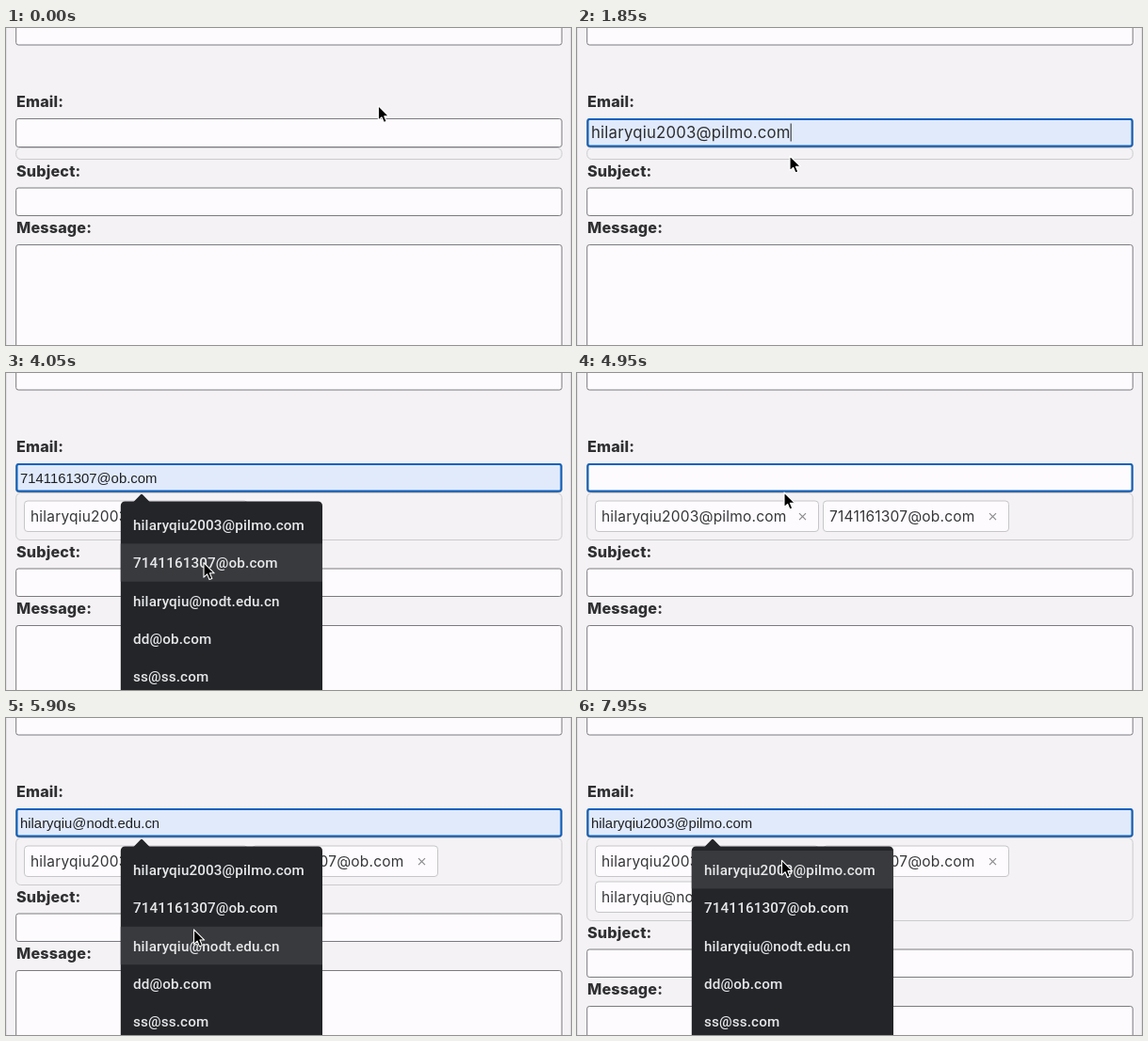
Recreate the animation shown at these times as an HTML page. Size 600 by 337 pixels, loop 8 s.

```html
<!DOCTYPE html>
<html lang="en">
<head>
<meta charset="utf-8">
<title>Email tag input</title>
<style>
html, body { margin: 0; width: 100%; height: 100%; overflow: hidden; background: #f4f2f5; }
svg { display: block; width: 100vw; height: 100vh; }
text { white-space: pre; }
.label { font: 800 16.2px Inter, sans-serif; letter-spacing: .15px; fill: #303033; }
.box { fill: #fdfbfe; stroke: #7b7a7e; }
.typed { font: 400 16.7px Inter, sans-serif; letter-spacing: .22px; fill: #2d2d30; }
.preview { font: 14.87px "Liberation Sans", Arial, sans-serif; fill: #202124; }
.tags { fill: #f4f2f5; stroke: #cbcacd; }
.tag rect { fill: #fdfbfe; stroke: #c6c5c9; }
.tag text { font: 400 15.5px Inter, sans-serif; letter-spacing: .2px; fill: #363639; }
.tag path { fill: none; stroke: #8b8a8e; stroke-width: 1.2; }
.menu { fill: #232528; }
.menu text { font: 500 15.2px Roboto, sans-serif; letter-spacing: .15px; fill: #e6e7e9; }
</style>
</head>
<body>
<svg viewBox="0 0 600 337" preserveAspectRatio="none">
  <defs>
    <path id="bar" d="M-3.2 -9Q0 -9 0 -6.5Q0 -9 3.2 -9M0 -6.5V6.5M-3.2 9Q0 9 0 6.5Q0 9 3.2 9M-1.8 3.5H1.8"/>
  </defs>
  <path d="M.5 0V337M599.5 0V337" stroke="#e3e1e5"/>
  <rect class="box" x="10.7" y="-20" width="579.5" height="38" rx="2.5"/>
  <text class="label" x="11" y="83.5">Email:</text>
  <rect class="box" x="10.7" y="96.5" width="579.5" height="30" rx="2.5"/>
  <rect id="focus" x="11.5" y="97" width="578" height="28.5" rx="2" stroke="#0f62be" stroke-width="2"/>
  <text id="value" x="15" y="116.5"></text>
  <path id="caret" stroke="#222" d="M0 101.5V120.5"/>
  <rect class="tags" id="tags" x="10.7" y="127.5" width="579.5" rx="5"/>
  <g id="list"></g>
  <g id="below">
    <text class="label" x="11" y="157.5">Subject:</text>
    <rect class="box" x="10.7" y="170" width="579.5" height="29.5" rx="2.5"/>
    <text class="label" x="11" y="218">Message:</text>
    <rect class="box" x="10.7" y="230.5" width="579.5" height="150" rx="2.5"/>
  </g>
  <g class="menu" id="menu">
    <path d="M134.5 138L142.7 129.4Q144 128 145.3 129.4L153.5 138Z"/>
    <rect x="121.8" y="136.5" width="214.2" height="230" rx="4.5"/>
    <rect id="hover" x="121.8" width="214.2" height="40.4" fill="#393a3d"/>
  </g>
  <g id="cursor">
    <path id="arrow" d="M0 0V15.6L3.6 12.3L6 18L8.8 16.8L6.4 11.2H11.2Z" stroke="#fff" stroke-width="1.1" stroke-linejoin="round"/>
    <g id="beam" fill="none" stroke-linecap="round">
      <use href="#bar" stroke="#fff" stroke-width="2.6"/>
      <use href="#bar" stroke="#222" stroke-width="1.2"/>
    </g>
  </g>
</svg>
<script>
const LOOP = 8000, ROW_TOP = 141, ROW = 40.4, LINE = 38;
const MS_PER_PX = 3.6, PAUSE = 350;
const mails = ['hilaryqiu2003@pilmo.com', '7141161307@ob.com', 'hilaryqiu@nodt.edu.cn', 'dd@ob.com', 'ss@ss.com'];

// Each round opens the menu, picks a row, rests the pointer and adds a chip.
const rounds = [
  { row: 0, open: 700, pick: 1600, add: 2500, rest: [226, 136] },
  { row: 1, open: 3050, pick: 4150, add: 4600, rest: [220, 127] },
  { row: 2, open: 5250, pick: 6400, add: 7100, rest: [222, 151] },
  { row: 0, open: 7500, pick: LOOP, add: LOOP, rest: [222, 151] }
];
const home = [399, 82], inField = [203, 111];
const rowSpot = row => [221 - 11 * row, ROW_TOP + ROW * (row + .5)];

const $ = id => document.getElementById(id);
const show = (el, on) => el.setAttribute('visibility', on ? 'visible' : 'hidden');
const shiftY = (el, y) => el.setAttribute('transform', `translate(0 ${y})`);

function add(parent, name, attrs, text = '') {
  const el = document.createElementNS('http://www.w3.org/2000/svg', name);
  for (const k in attrs) el.setAttribute(k, attrs[k]);
  el.textContent = text;
  return parent.appendChild(el);
}

function chip(x, y, w, mail) {
  const g = add($('list'), 'g', { class: 'tag' });
  add(g, 'rect', { x, y, width: w, height: 32.5, rx: 3.5 });
  add(g, 'text', { x: x + 6.5, y: y + 21.5 }, mail);
  add(g, 'path', { d: `M${x + w - 20.5} ${y + 13.2}l7 7m0 -7l-7 7` });
  return g;
}
const chips = [
  chip(19.5, 136, 237, mails[0]),
  chip(261.5, 136, 197, mails[1]),
  chip(19.5, 136 + LINE, 212, mails[2])
];
mails.forEach((m, i) => add($('menu'), 'text', { x: 135, y: 166.8 + i * ROW }, m));

const travel = (a, b) => MS_PER_PX * Math.max(Math.abs(b[0] - a[0]), Math.abs(b[1] - a[1]));

// Pointer moves: rest to field, field to row, row to the next rest.
const moves = [];
let from = home;
for (const r of rounds) {
  const spot = rowSpot(r.row);
  moves.push([r.open - travel(from, inField), from, inField]);
  moves.push([r.open + PAUSE, inField, spot]);
  moves.push([r.pick + 100, spot, r.rest]);
  from = r.rest;
}

function pointer(t) {
  const [start, a, b] = moves.filter(m => m[0] <= t).pop() || [0, home, home];
  const left = 1 - Math.min(1, (t - start) / (travel(a, b) || 1));
  return a.map((v, i) => b[i] + (v - b[i]) * left * left);
}

function draw(t) {
  const [x, y] = pointer(t);
  const open = rounds.some(r => t >= r.open && t < r.pick);
  const picked = rounds.find(r => t >= r.pick && t < r.add);
  const count = rounds.filter(r => t >= r.add).length;
  const hovered = open && y >= ROW_TOP ? Math.floor((y - ROW_TOP) / ROW) : -1;
  const shift = LINE * Math.ceil(count / 2);
  const text = mails[picked ? picked.row : hovered] || '';

  show($('focus'), t >= rounds[0].open);
  $('focus').setAttribute('fill', text ? '#e0eafb' : '#fdfbfe');
  $('value').setAttribute('class', picked ? 'typed' : 'preview');
  $('value').textContent = text;

  const blink = picked && (t - picked.pick) % 1000 < 500;
  show($('caret'), blink);
  if (blink) $('caret').setAttribute('transform', `translate(${15.5 + $('value').getComputedTextLength()})`);

  $('tags').setAttribute('height', 12 + shift);
  shiftY($('below'), shift);
  chips.forEach((c, i) => show(c, i < count));

  show($('menu'), open);
  show($('hover'), hovered >= 0);
  $('hover').setAttribute('y', ROW_TOP + Math.max(hovered, 0) * ROW);

  const overField = y > 97 && y < 126;
  const overChip = !open && count > 0 && x < 224 && y > 143 && y < 161;
  const overSubject = !open && y > 170 + shift && y < 199 + shift;
  const beam = overField || overChip || overSubject;
  show($('beam'), beam);
  show($('arrow'), !beam);
  $('cursor').setAttribute('transform', `translate(${x} ${y})`);
}

const start = performance.now();
function tick() {
  draw((performance.now() - start) % LOOP);
  requestAnimationFrame(tick);
}
tick();
</script>
</body>
</html>
```
